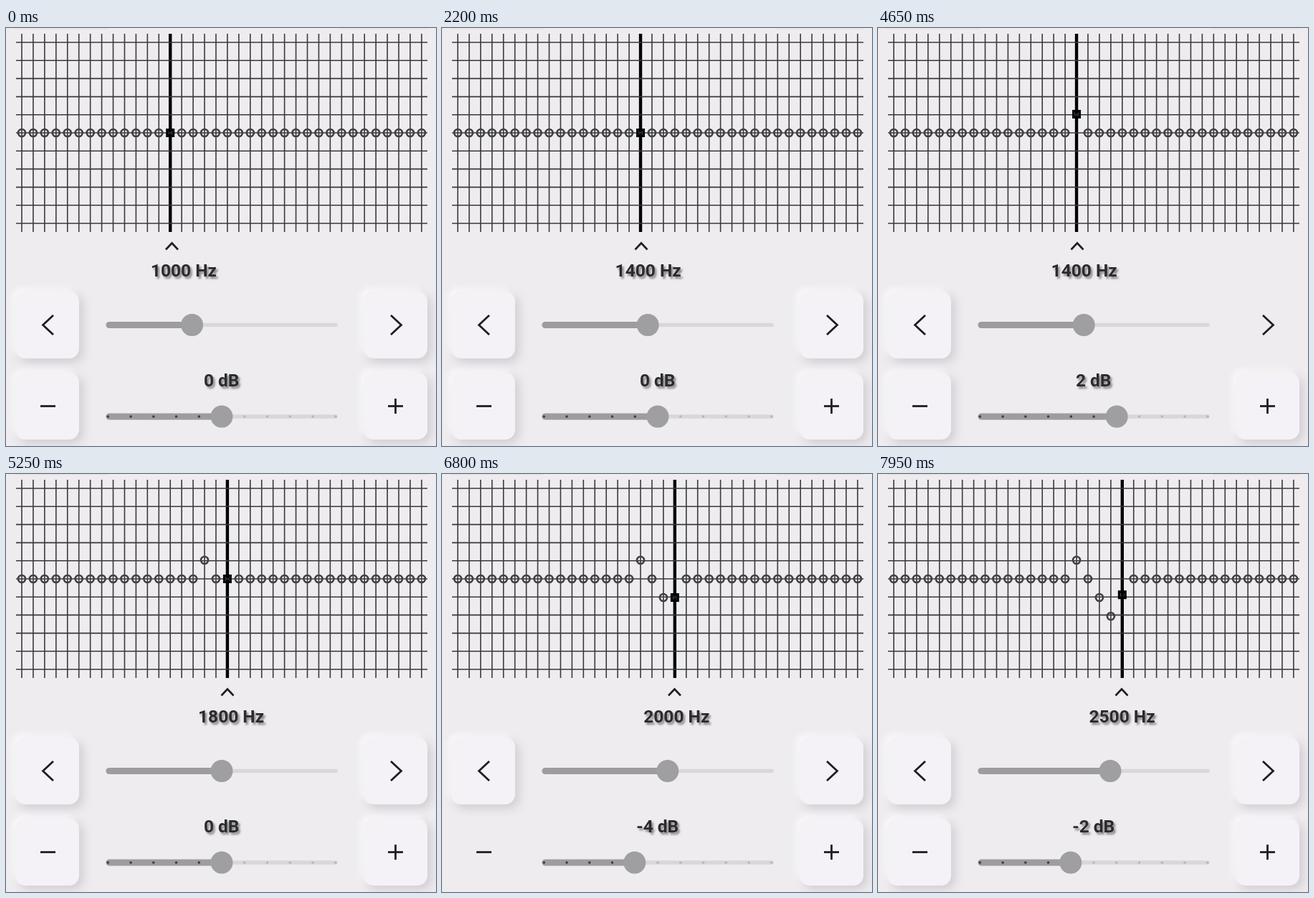
These frames come from a looping animation (600 px wide and 582 px high, 8 s). An HTML page with a canvas:

```html
<!DOCTYPE html>
<html lang="en">
<head>
<meta charset="utf-8">
<title>Equalizer</title>
<style>
  html, body { margin: 0; height: 100%; overflow: hidden; background: #eeecef; }
  canvas { display: block; }
</style>
</head>
<body>
<canvas id="stage" width="600" height="582"></canvas>
<script>
const ctx = document.getElementById('stage').getContext('2d');
const LOOP = 8000, STEP = 50, BANDS = 36, FIRST = 13;
const HZ = [1000, 1100, 1250, 1400, 1600, 1800, 2000, 2500];

// [time of the new value, button, flat from, flat until]
const CLICKS = [
  [1000, '>', 950, 1050], [1500, '>', 1450, 1550], [2000, '>', 1950, 2050],
  [3300, '+', 3250, 3350],
  [4700, '>', 4600, 4750], [5200, '>', 5150, 5250],
  [5700, '-', 5600, 5750],
  [6200, '>', 6200, 6200],
  [6450, '-', 6400, 6500], [6800, '-', 6750, 6850],
  [7400, '>', 7350, 7450],
  [7800, '-', 7800, 7900]
];

const bandX = i => 22 + 15.94 * i;
const gainY = g => 146 - 13 * g;
const ease = p => (1 - Math.cos(Math.PI * Math.min(1, Math.max(0, p)))) / 2;
const mix = (a, b, p) => a + (b - a) * p;

function stateAt(t) {
  const s = { band: FIRST, gains: Array(BANDS).fill(0), gain: 0, bandPos: FIRST, gainPos: 0, flat: '' };
  for (const [time, key, from, until] of CLICKS) {
    if (t >= from && t < until) s.flat = key;
    if (t < time) continue;
    const oldBand = s.band, oldGain = s.gain, knob = ease((t - time) / 100);
    if (key === '>') {
      s.gains[s.band++] = s.gain;
      s.gain = 0;
    } else {
      s.gain += key === '+' ? 2 : -2;
      s.gains[s.band] = mix(oldGain, s.gain, ease((t - time) / 200));
    }
    s.bandPos = mix(oldBand, s.band, knob);
    s.gainPos = mix(oldGain, s.gain, knob);
  }
  return s;
}

function line(points, color, width, cap = 'butt') {
  ctx.beginPath();
  points.forEach(([x, y]) => ctx.lineTo(x, y));
  ctx.strokeStyle = color;
  ctx.lineWidth = width;
  ctx.lineCap = cap;
  ctx.stroke();
}

function disc(x, y, r, color) {
  ctx.beginPath();
  ctx.arc(x, y, r, 0, 7);
  ctx.fillStyle = color;
  ctx.fill();
}

function shadow(color, offset, blur) {
  ctx.shadowColor = color;
  ctx.shadowOffsetX = ctx.shadowOffsetY = offset;
  ctx.shadowBlur = blur;
}

function label(text, x, y) {
  ctx.save();
  ctx.font = 'bold 24.5px Roboto, sans-serif';
  ctx.textAlign = 'center';
  ctx.fillStyle = '#2b2a2d';
  shadow('rgba(0,0,0,.45)', 2.5, 3);
  ctx.fillText(text, x, y);
  ctx.restore();
}

function chart(s) {
  for (let i = 0; i < BANDS; i++) {
    const on = i === s.band;
    line([[bandX(i), 8], [bandX(i), 284]], on ? '#000' : '#3a393b', on ? 4.4 : 1.6);
  }
  for (let i = 0; i < 11; i++) {
    const y = 20 + 25.2 * i;
    line([[14, y], [588, y]], '#3a393b', 1.6);
  }
  s.gains.forEach((g, i) => {
    const x = bandX(i), y = gainY(g);
    if (i === s.band) {
      ctx.strokeStyle = '#000';
      ctx.lineWidth = 3.6;
      ctx.strokeRect(x - 4.2, y - 4.2, 8.4, 8.4);
    } else {
      ctx.beginPath();
      ctx.arc(x, y, 5, 0, 7);
      ctx.strokeStyle = '#403f41';
      ctx.lineWidth = 2.7;
      ctx.stroke();
    }
  });
}

function button(key, x, y, icon, flat) {
  if (!flat) {
    ctx.save();
    ctx.beginPath();
    ctx.roundRect(x, y, 89, 93, 14);
    ctx.fillStyle = '#f4f2f6';
    shadow('rgba(255,255,255,.9)', -4, 10);
    ctx.fill();
    shadow('rgba(120,115,125,.27)', 5, 14);
    ctx.fill();
    ctx.restore();
  }
  icon.forEach(path => line(path, '#1f1e21', 2.8));
}

function slider(y, x, ticks) {
  line([[142, y], [460, y]], '#d9d7da', 5.5, 'round');
  line([[144, y], [x, y]], '#9d9c9e', 9, 'round');
  for (let i = 0; i < ticks; i++) {
    const tx = 142.3 + 31.75 * i;
    disc(tx, y, 1.8, tx < x ? '#3d3c3e' : '#b7b5b8');
  }
  disc(x, y, 15.5, '#9f9ea0');
}

function draw(t) {
  const s = stateAt(t), n = s.band - FIRST;
  ctx.fillStyle = '#eeecef';
  ctx.fillRect(0, 0, 600, 582);
  ctx.fillStyle = '#e4e2e5';
  ctx.fillRect(12, 0, 130, 1.5);
  ctx.fillRect(467, 0, 122, 1.5);

  chart(s);
  const ax = 231.5 + 15.5 * n;
  line([[ax - 8.5, 308.5], [ax, 299.5], [ax + 8.5, 308.5]], '#1f1e21', 2.6);
  label(HZ[n] + ' Hz', 248 + 13.22 * n, 346);
  label(s.gain + ' dB', 300.7, 499);

  button('<', 13, 367, [[[66, 400], [51.5, 413.5], [66, 427]]], false);
  button('>', 499, 367, [[[537, 400], [551.5, 413.5], [537, 427]]], s.flat === '>');
  button('-', 13, 480, [[[48, 526.5], [69, 526.5]]], s.flat === '-');
  button('+', 499, 480, [[[533, 526.5], [554, 526.5]], [[543.5, 516], [543.5, 537]]], s.flat === '+');

  slider(413.5, 140 + 9.2 * s.bandPos, 0);
  slider(541, 301 + 16.1 * s.gainPos, 11);
}

let start;
function tick(now) {
  start ??= now;
  draw(Math.floor((now - start) % LOOP / STEP) * STEP);
  requestAnimationFrame(tick);
}
draw(0);
requestAnimationFrame(tick);
</script>
</body>
</html>
```
